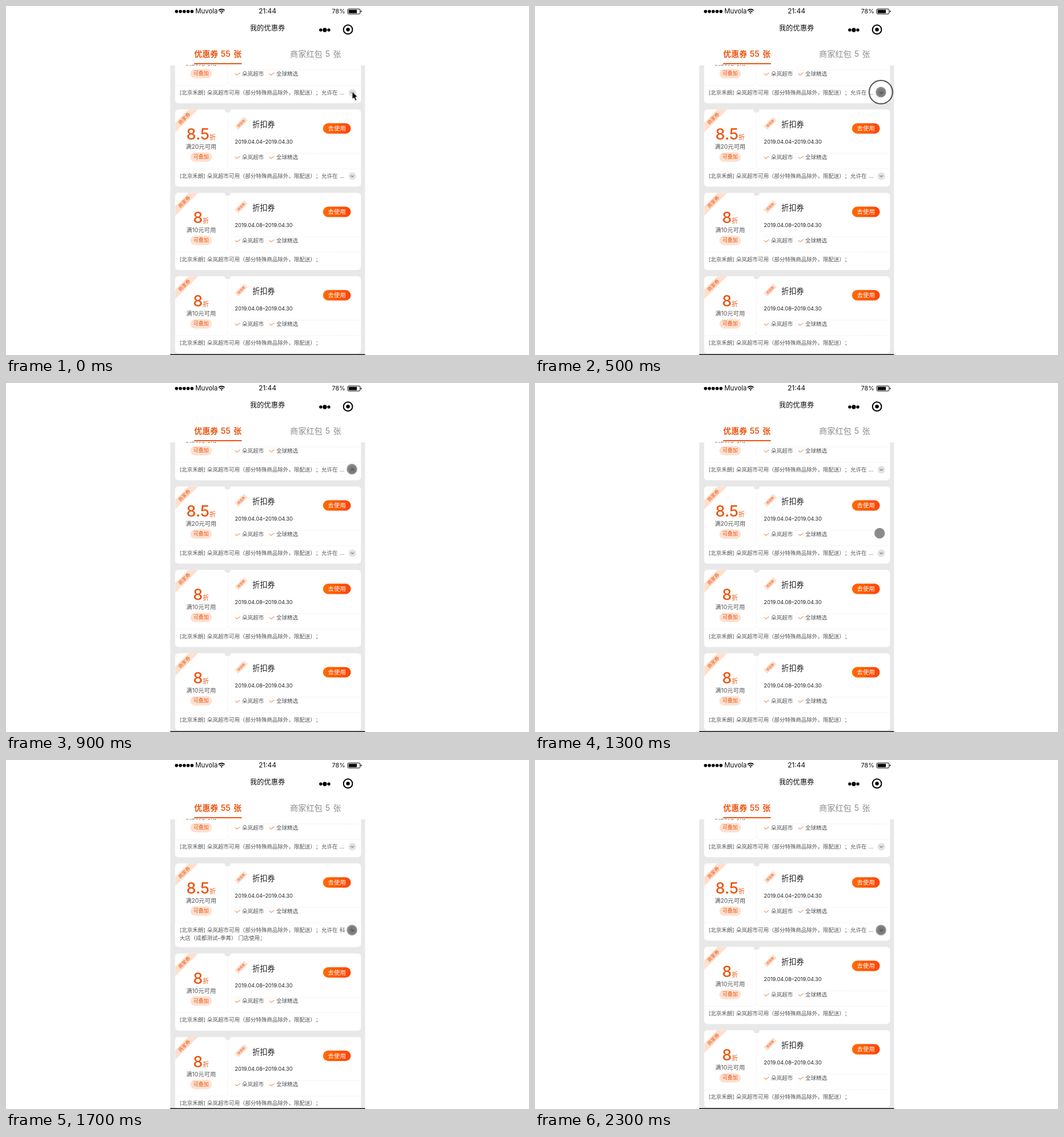
An HTML page that plays this animation: 917 by 611 pixels, repeating every 2400 ms.

```html
<!DOCTYPE html>
<html lang="zh-CN">
<head>
<meta charset="utf-8">
<title>我的优惠券</title>
<style>
  html, body { margin: 0; width: 100%; height: 100%; overflow: hidden; background: #fff; }
  svg { display: block; }
  text {
    font-family: Inter, "Noto Sans CJK SC", "Noto Sans CJK", sans-serif;
    text-spacing-trim: space-all;
    white-space: pre;
  }
  .mid { text-anchor: middle; }
  .accent { fill: #ec5510; }

  .anim { animation: 2400ms step-end infinite; }
  .push-first { animation-name: push-first; }
  .push-both { animation-name: push-both; }
  .open-first { animation-name: open-first; opacity: 0; }
  .open-second { animation-name: open-second; opacity: 0; }
  .turn-first { animation-name: turn-first; }
  .turn-second { animation-name: turn-second; }
  .arrow { animation-name: arrow; }
  .touch { animation-name: touch; }
  .dot { animation-name: dot; }
  .ring { animation-name: ring; opacity: 0; }

  @keyframes push-first {
    0%, 37.5% { transform: none; }
    25% { transform: translateY(11.5px); }
  }
  @keyframes push-both {
    0%, 37.5%, 87.5% { transform: none; }
    25%, 70.833% { transform: translateY(11.5px); }
  }
  @keyframes open-first {
    0%, 37.5% { opacity: 0; }
    25% { opacity: 1; }
  }
  @keyframes open-second {
    0%, 87.5% { opacity: 0; }
    70.833% { opacity: 1; }
  }
  @keyframes turn-first {
    0%, 45.833% { transform: none; }
    25% { transform: rotate(35deg); }
    29.167% { transform: rotate(180deg); }
    41.667% { transform: rotate(145deg); }
  }
  @keyframes turn-second {
    0%, 95.833% { transform: none; }
    70.833% { transform: rotate(35deg); }
    75% { transform: rotate(180deg); }
    91.667% { transform: rotate(145deg); }
  }
  @keyframes arrow {
    0% { opacity: 1; }
    4.167%, 100% { opacity: 0; }
  }
  @keyframes dot {
    0% { opacity: 0; }
    4.167%, 100% { opacity: 1; }
  }
  @keyframes touch {
    0% { transform: translate(606.5px, 150.7px); }
    45.833% { transform: translate(606px, 166px); }
    50% { transform: translate(604.6px, 214px); }
    54.167% { transform: translate(604.2px, 263px); }
    58.333% { transform: translate(605.6px, 290px); }
    62.5%, 100% { transform: translate(606.6px, 297.7px); }
  }
  @keyframes ring {
    0%, 25%, 37.5%, 70.833%, 87.5% { opacity: 0; }
    20.833%, 33.333%, 66.667%, 83.333% { opacity: 1; }
  }
</style>
</head>
<body>
<svg width="917" height="611" viewBox="0 0 917 611">
  <defs>
    <linearGradient id="btn">
      <stop offset="0" stop-color="#ff6a00"/>
      <stop offset="1" stop-color="#fd4508"/>
    </linearGradient>
    <clipPath id="view"><path d="M288 103H629.5V611H288Z"/></clipPath>
  </defs>

  <path d="M288 104H629.5V611H288Z" fill="#e8e8e8"/>
  <g id="list" clip-path="url(#view)"></g>
  <path d="M288 609.5H629.5V611H288Z" fill="#111"/>

  <g id="dots" fill="#000"></g>
  <g fill="#111">
    <text x="332" y="13" font-size="11.4">Muvola</text>
    <text class="mid" x="458.5" y="13.2" font-size="12">21:44</text>
    <text x="571.5" y="13" font-size="10.8">78%</text>
  </g>
  <g fill="none" stroke="#000" stroke-width="1.7">
    <path d="M372.8 7.8a7.4 7.4 0 0 1 10.4 0M374.9 10.2a4.4 4.4 0 0 1 6.2 0"/>
    <path d="M378 13.6l-1.7-1.9q1.7-1.3 3.4 0z" fill="#000" stroke="none"/>
    <rect x="599.2" y="5.2" width="21.6" height="8.8" rx="1.8" stroke-width="1"/>
    <rect x="600.8" y="6.8" width="14.4" height="5.6" rx=".6" fill="#000" stroke="none"/>
    <path d="M622 8v3.2q1.6-.4 1.6-1.6t-1.6-1.6z" fill="#000" stroke="none"/>
    <circle cx="599.6" cy="41.2" r="7.9" stroke-width="2"/>
  </g>
  <circle cx="599.6" cy="41.2" r="3.2"/>
  <circle cx="551.8" cy="42" r="2.7"/>
  <circle cx="558.9" cy="42" r="3.7"/>
  <circle cx="566" cy="42" r="2.7"/>

  <text class="mid" x="458.5" y="43.1" font-size="12.3" fill="#111">我的优惠券</text>
  <g font-size="14" font-weight="600" class="accent">
    <text x="330" y="89.3">优惠券</text>
    <text x="376.5" y="89.3">55</text>
    <text x="399" y="89.3">张</text>
  </g>
  <path d="M330 100H413.5V102H330Z" class="accent"/>
  <g font-size="14.2" fill="#8c8c8c">
    <text x="498" y="89.3">商家红包</text>
    <text x="559.8" y="89.3">5</text>
    <text x="573.5" y="89.3">张</text>
  </g>

  <g class="anim touch">
    <circle class="anim dot" r="9.2" fill="#000" fill-opacity=".46"/>
    <circle class="anim ring" r="20.6" fill="none" stroke="#111" stroke-width="1.5"/>
    <path class="anim arrow" d="M.6-.9V12.6L3.6 9.8 6 15.2 8.6 14 6.2 8.8H10.2Z" fill="#000" stroke="#fff" stroke-width=".9"/>
  </g>
</svg>

<script>
  const peach = '#fde0cf';

  // Text placed by its vertical centre
  const label = (x, y, size, str, attrs = 'fill="#555"') =>
    `<text x="${x}" y="${y + size * 0.37}" font-size="${size}" ${attrs}>${str}</text>`;

  const tilted = (x, y, fontSize) =>
    `<g transform="translate(${x} ${y}) rotate(-45)">
      ${label(0, 0, fontSize, '商家券', 'class="mid accent" font-weight="500"')}</g>`;

  const ribbon = `<path d="M296.8 23.2l23-23h17l-40 40Z" fill="${peach}"/>
    ${tilted(312.5, 16, 8.6)}`;

  const tag = `<rect x="-11.7" y="-4.5" width="23.4" height="9" fill="${peach}"
      transform="translate(412.4 24.4) rotate(-45)"/>
    ${tilted(412.4, 24.4, 5.6)}`;

  const tick = x =>
    `<path d="M${x} 83.3l3 2.6 5.6-3.9" fill="none" stroke="#f29a62" stroke-width="1.2"/>`;

  const note = (x, str, y = 116.4) => label(x, y, 9.5, str);

  const terms = end => note(304.5, '[北京禾朗]') +
    note(352.7, '朵岚超市可用（部分特殊商品除外，限配送）；') + end;

  const allow = rest => note(553, '允许在') + note(585, rest);

  const more = name => `<g class="anim open-${name}">
    <path d="M296.5 107H622.5V140.5a6 6 0 0 1-6 6H302.5a6 6 0 0 1-6-6Z" fill="#fff"/>
    ${terms(allow('科'))}
    ${note(304.5, '大店（成都测试–季苒） 门店使用；', 130.8)}
  </g>`;

  const toggle = name => `<g transform="translate(607.2 116.8)">
    <circle r="6.6" fill="#e2e2e2"/>
    <path class="anim turn-${name}" d="M-2.6-1.2L0 1.3 2.6-1.2" fill="none" stroke="#666" stroke-width="1.1"/>
  </g>`;

  const card = ({ top, rate, min, date, push = '', opens }) => `
    <g class="anim ${push}"><g transform="translate(0 ${top})">
      <rect x="296.5" width="326" height="135.2" rx="6" fill="#fff"/>
      ${ribbon}
      <path d="M383 0a5.5 5.5 0 0 0 11 0Z" fill="#e8e8e8"/>
      <path d="M297 104H382Q388.5 104 388.5 97V7M622 104H395Q388.5 104 388.5 97M401 77H622"
        fill="none" stroke="#ebebeb" stroke-width=".9" stroke-dasharray="2 1.5"/>
      <text class="mid accent" x="342" y="53.4" font-size="27" font-weight="500">${rate}<tspan
        font-size="10.8" font-weight="400" dy="-.6">折</tspan></text>
      ${label(342, 65.4, 10.3, `满${min}元可用`, 'class="mid" fill="#555"')}
      <rect x="323.3" y="75.3" width="37.6" height="16.4" rx="8.2" fill="${peach}"/>
      ${label(342, 83, 8.8, '可叠加', 'class="mid accent" font-weight="500"')}
      ${tag}
      ${label(432, 26.4, 13.2, '折扣券', 'fill="#222"')}
      ${label(401.3, 56.3, 9.2, date, 'fill="#222"')}
      <rect x="555.8" y="24.3" width="48.8" height="18.2" rx="9.1" fill="url(#btn)"/>
      ${label(580.2, 33.2, 10.4, '去使用', 'class="mid" fill="#fff"')}
      ${tick(401.8)}${note(414, '朵岚超市', 83.4)}
      ${tick(461.8)}${note(474, '全球精选', 83.4)}
      ${terms(opens ? allow('...') : '')}
      ${opens ? more(opens) + toggle(opens) : ''}
    </g></g>`;

  const early = '2019.04.04–2019.04.30';
  const late = '2019.04.08–2019.04.30';
  const cards = [
    { top: 35, rate: '8.5', min: 20, date: early, opens: 'first' },
    { top: 181, rate: '8.5', min: 20, date: early, push: 'push-first', opens: 'second' },
    { top: 327, rate: '8', min: 10, date: late, push: 'push-both' },
    { top: 473, rate: '8', min: 10, date: late, push: 'push-both' }
  ];
  document.getElementById('list').innerHTML = cards.map(card).join('');

  document.getElementById('dots').innerHTML = [0, 1, 2, 3, 4]
    .map(i => `<circle cx="${299 + i * 6.75}" cy="9.6" r="2.8"/>`).join('');
</script>
</body>
</html>
```
